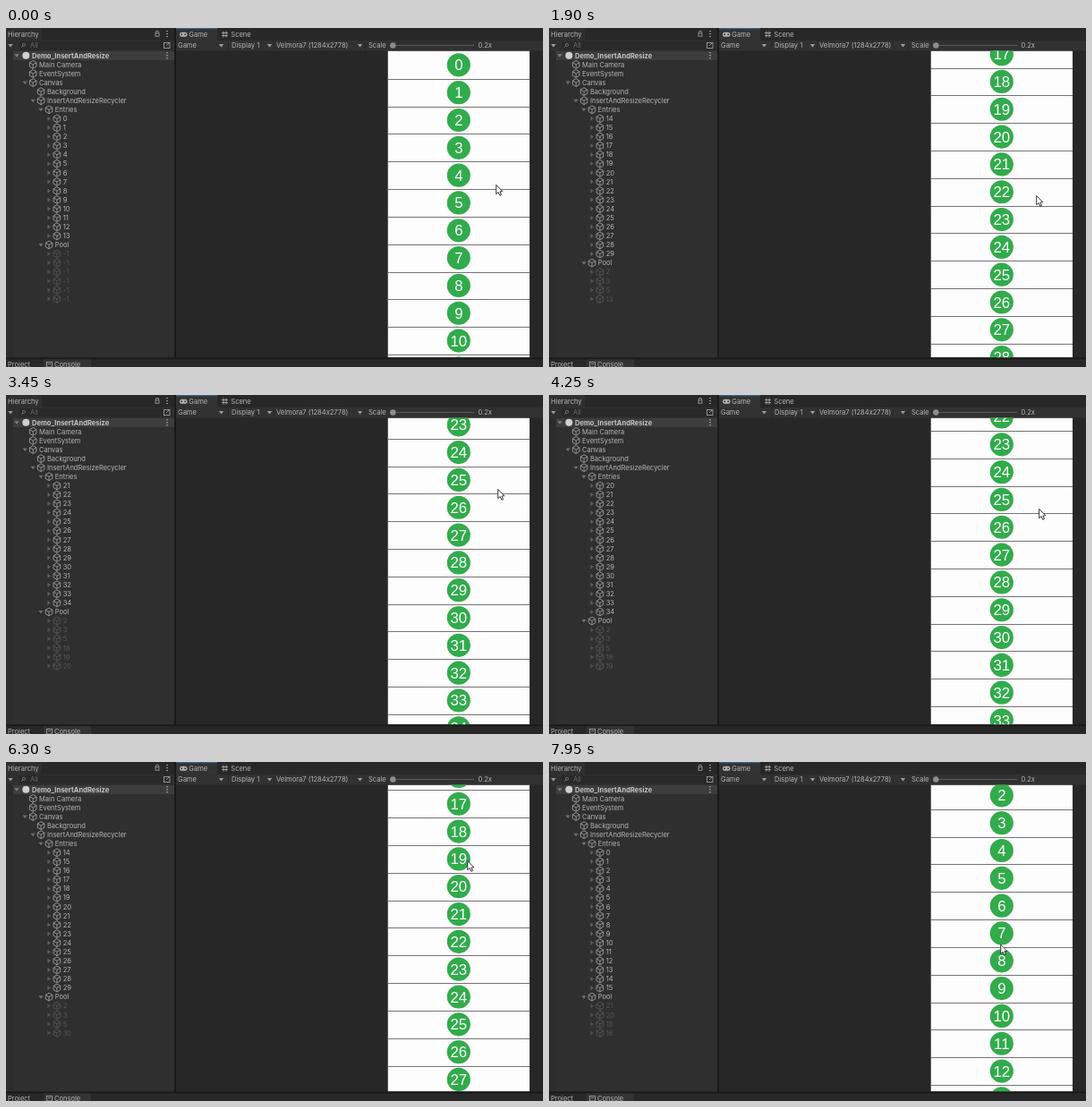
Animation of 600x379 px, one loop 8000 ms. Source, as an HTML page with a canvas:

```html
<!DOCTYPE html>
<html>
<head>
<meta charset="utf-8">
<style>
html, body { margin: 0; width: 100%; height: 100%; overflow: hidden; background: #282828; }
canvas { display: block; width: 600px; height: 379px; }
</style>
</head>
<body>
<canvas id="stage" width="600" height="379"></canvas>
<script>
const ctx = document.getElementById('stage').getContext('2d');
const LOOP = 8000, ROWS = 35, PITCH = 30.82, ORIGIN = 26;
const LIST = { x: 426.5, y: 25.6, w: 158.5, h: 342.9 };
const TREE_TOP = 30.8, TREE_PITCH = 10.08, INDENT = 8.9;
const PANEL = '#302f30', TEXT = '#b4b4b4', ICON = '#9c9c9c', DIM = '#565656';
const UI = 'Inter, Roboto, sans-serif', DIGITS = '"Liberation Sans", Arial, sans-serif';

// time, list scroll, pointer x, pointer y
const KEYS = [
  [0, 0, 547, 175], [300, 15, 548, 160], [620, 80, 553, 104], [850, 219.7, 553, 107],
  [1250, 400, 551, 125], [1900, 536, 544, 187], [2250, 618, 548, 112], [2550, 690, 549, 100],
  [3150, 722, 549, 98], [3450, 717, 549, 105], [4250, 695, 547, 127], [5100, 639.5, 540, 181],
  [5500, 580, 536, 170], [6300, 518.7, 515, 110], [6700, 440, 513, 188], [7050, 220, 510, 210],
  [7500, 0, 506, 240], [7720, 0, 505, 258], [7950, 65.4, 504, 204], [8000, 80, 504, 190]
];

const clamp = (v, lo, hi) => Math.min(hi, Math.max(lo, v));
const range = (from, to) => Array.from({ length: Math.max(0, to - from + 1) }, (_, i) => from + i);

// Monotone cubic interpolation: eased motion without overshoot.
function secant(i, c) {
  return (KEYS[i + 1][c] - KEYS[i][c]) / (KEYS[i + 1][0] - KEYS[i][0]);
}
function slope(i, c) {
  if (!i || i === KEYS.length - 1) return secant(clamp(i, 0, KEYS.length - 2), c);
  const a = secant(i - 1, c), b = secant(i, c);
  return a * b <= 0 ? 0 : 2 * a * b / (a + b);
}
function sample(t, c) {
  let i = 0;
  while (i < KEYS.length - 2 && KEYS[i + 1][0] <= t) i++;
  const h = KEYS[i + 1][0] - KEYS[i][0], u = (t - KEYS[i][0]) / h;
  const a = KEYS[i][c], b = KEYS[i + 1][c];
  return a + (b - a) * u * u * (3 - 2 * u) +
    h * u * (1 - u) * (slope(i, c) * (1 - u) - slope(i + 1, c) * u);
}

function rect(x, y, w, h, color) {
  ctx.fillStyle = color;
  ctx.fillRect(x, y, w, h);
}
function disc(x, y, r, color) {
  ctx.fillStyle = color;
  ctx.beginPath();
  ctx.arc(x, y, r, 0, 7);
  ctx.fill();
}
function poly(points, fill, stroke, width = 1) {
  ctx.beginPath();
  points.forEach(([x, y]) => ctx.lineTo(x, y));
  ctx.closePath();
  if (fill) { ctx.fillStyle = fill; ctx.fill(); }
  if (stroke) { ctx.strokeStyle = stroke; ctx.lineWidth = width; ctx.stroke(); }
}
function line(color, width, ...points) {
  ctx.strokeStyle = color;
  ctx.lineWidth = width;
  ctx.beginPath();
  points.forEach(([x, y]) => ctx.lineTo(x, y));
  ctx.stroke();
}
function arc(x, y, r, from, to, color) {
  ctx.strokeStyle = color;
  ctx.lineWidth = 0.9;
  ctx.beginPath();
  ctx.arc(x, y, r, from, to);
  ctx.stroke();
}
function frameBox(x, y, w, h) {
  ctx.strokeStyle = ICON;
  ctx.lineWidth = 0.9;
  ctx.strokeRect(x, y, w, h);
}
function label(text, x, y, color = TEXT, weight = 400) {
  ctx.font = `${weight} 7.56px ${UI}`;
  ctx.fillStyle = color;
  ctx.textAlign = 'left';
  ctx.textBaseline = 'alphabetic';
  ctx.fillText(text, x, y + 2.7);
}
function downArrow(x, y, color = ICON) {
  poly([[x - 2.6, y - 1.5], [x + 2.6, y - 1.5], [x, y + 2]], color);
}
function rightArrow(x, y, color) {
  poly([[x - 1.5, y - 2.6], [x + 2, y], [x - 1.5, y + 2.6]], color);
}
function dots(x, y) {
  for (const d of [-3, 0, 3]) disc(x, y + d, 0.8, TEXT);
}
function cube(x, y, color) {
  const hex = range(0, 5).map(i => {
    const a = Math.PI * (i / 3 + 1 / 6);
    return [x + 4.4 * Math.cos(a), y + 4.4 * Math.sin(a)];
  });
  poly(hex, null, color, 0.9);
  for (const i of [1, 3, 5]) line(color, 0.9, [x, y], hex[i]);
}

// Which rows are live and which wait in the pool, in the order listed.
function recycle(t, scroll) {
  const goingDown = t < 3500;
  const lag = t < 2600 ? 13 : 0;
  const first = Math.floor(Math.max(0, scroll - lag) / PITCH);
  const start = Math.max(0, first - 2), last = Math.min(ROWS - 1, first + 13);
  const count = last - start + 1, spare = 20 - count;
  let pool;
  if (goingDown && start < 7) {
    pool = [...Array(Math.max(0, spare - start)).fill(-1), ...range(Math.max(0, start - 4), start - 1)];
  } else if (goingDown || start > 18) {
    pool = [2, 3, 5, ...range(start - spare + 3, start - 1)];
  } else {
    const shift = last >= 20 ? 0 : last === 19 ? 1 : last >= 17 ? 2 : 3;
    const extra = range(last + 1, last + spare - 3).reverse();
    pool = [...[2, 3, 5, 21, 20, 18].slice(shift, shift + 3), ...extra];
  }
  return { entries: range(start, last), pool };
}

function treeRow(index, depth, text, arrow, dim) {
  const y = TREE_TOP + index * TREE_PITCH, x = 30.2 + depth * INDENT;
  if (arrow === 'open') downArrow(x - 9, y, '#707070');
  if (arrow === 'shut') rightArrow(x - 9, y, dim ? '#505050' : '#5e5e5e');
  cube(x, y, dim ? DIM : ICON);
  label(text, x + 6.8, y, dim ? DIM : TEXT);
}

function drawHierarchy(t, scroll) {
  rect(0, 0, 188, 369, PANEL);
  rect(40, 0, 148, 14, '#282828');
  rect(0, 26, 8, 343, '#2d2c2d');
  rect(8, 26, 180, 10, '#3e3d3e');
  label('Hierarchy', 2, 7.3);
  arc(169, 5, 1.7, Math.PI, 0, ICON);
  frameBox(167, 5.8, 4, 3.4);
  dots(180, 6.5);

  downArrow(5, 19.5);
  ctx.fillStyle = '#2a292a';
  ctx.beginPath();
  ctx.roundRect(14, 15, 172, 9.5, 3);
  ctx.fill();
  arc(20, 18.8, 1.6, 0, 7, '#757575');
  line('#757575', 0.9, [18.8, 20], [17, 21.8]);
  label('All', 27, 19.5, '#686868');
  frameBox(176.5, 16.5, 6.5, 6);
  line(ICON, 0.9, [179, 20], [183, 16]);

  downArrow(12, TREE_TOP, '#7c7c7c');
  disc(22.3, TREE_TOP, 4, '#d0d0d0');
  label('Demo_InsertAndResize', 29, TREE_TOP, '#c4c4c4', 700);
  dots(180, TREE_TOP);

  const { entries, pool } = recycle(t, scroll);
  const rows = [
    [0, 'Main Camera'], [0, 'EventSystem'], [0, 'Canvas', 'open'], [1, 'Background'],
    [1, 'InsertAndResizeRecycler', 'open'], [2, 'Entries', 'open'],
    ...entries.map(n => [3, n, 'shut']),
    [2, 'Pool', 'open'],
    ...pool.map(n => [3, n, 'shut', true])
  ];
  rows.forEach((row, i) => treeRow(i + 1, ...row));
}

function drawGameBar() {
  rect(190, 0, 410, 14, '#282828');
  rect(190, 0, 46, 14, '#343334');
  rect(190, 0, 46, 1.2, '#35608e');
  ctx.fillStyle = TEXT;
  ctx.beginPath();
  ctx.roundRect(194, 4.8, 8.5, 5, 2.5);
  ctx.fill();
  disc(196.3, 7.2, 0.9, PANEL);
  disc(200.2, 7.2, 0.9, PANEL);
  label('Game', 204.3, 7.3);
  for (const d of [-1.5, 1.5]) {
    line(ICON, 1, [244.5 + d, 3.5], [244.5 + d, 10.5]);
    line(ICON, 1, [241, 7 + d], [248, 7 + d]);
  }
  label('Scene', 251.3, 7.3);

  rect(190, 14, 410, 11.5, '#323132');
  for (const x of [248, 299, 401]) rect(x, 14, 1, 11.5, '#282828');
  for (const x of [240.5, 294.5, 395.5]) downArrow(x, 19.5);
  label('Game', 192, 19.5);
  label('Display 1', 252, 19.5);
  label('Velmora7 (1284x2778)', 302, 19.5);
  label('Scale', 405, 19.5);
  rect(430, 19, 93, 1, '#5a5a5a');
  disc(432.3, 19.5, 3.2, '#8e8e8e');
  label('0.2x', 527.5, 19.5);
}

function drawList(scroll) {
  const { x, y, w, h } = LIST;
  ctx.save();
  ctx.beginPath();
  ctx.rect(x, y, w, h);
  ctx.clip();
  rect(x, y, w, h, '#fefdfe');
  ctx.font = '16.8px ' + DIGITS;
  ctx.textAlign = 'center';
  ctx.textBaseline = 'alphabetic';
  for (let n = 0; n < ROWS; n++) {
    const center = ORIGIN + (n + 0.5) * PITCH - scroll;
    rect(x, Math.round(center + PITCH / 2), w, 1, '#747474');
    disc(505.8, center, 13.1, '#32ab4c');
    ctx.fillStyle = '#fff';
    ctx.fillText(n, 505.8, center + 6);
  }
  ctx.restore();
}

function drawBottomBar() {
  rect(0, 368.5, 600, 2, '#191919');
  rect(0, 370.5, 600, 9, '#282828');
  rect(42, 370.5, 53, 9, '#353435');
  frameBox(45.5, 373.5, 6, 5.5);
  line(ICON, 0.8, [47, 375.5], [50, 375.5]);
  label('Project', 2, 376.5);
  label('Console', 54, 376.5);
}

function drawPointer(x, y) {
  const shape = [[0, 0], [0, 10.2], [2.4, 8.1], [4.1, 11.8], [5.8, 11], [4.2, 7.5], [7.2, 7.2]];
  poly(shape.map(([dx, dy]) => [x + dx, y + dy]), '#fff', '#222', 0.9);
}

function frame(now) {
  const t = now % LOOP;
  const scroll = sample(t, 1);
  rect(0, 0, 600, 379, '#282728');
  drawHierarchy(t, scroll);
  rect(188, 0, 2, 369, '#191919');
  drawGameBar();
  drawList(scroll);
  drawBottomBar();
  drawPointer(sample(t, 2) + 0.7, sample(t, 3) + 0.5);
}

const startTime = performance.now();
(function tick() {
  frame(performance.now() - startTime);
  requestAnimationFrame(tick);
})();
</script>
</body>
</html>
```
